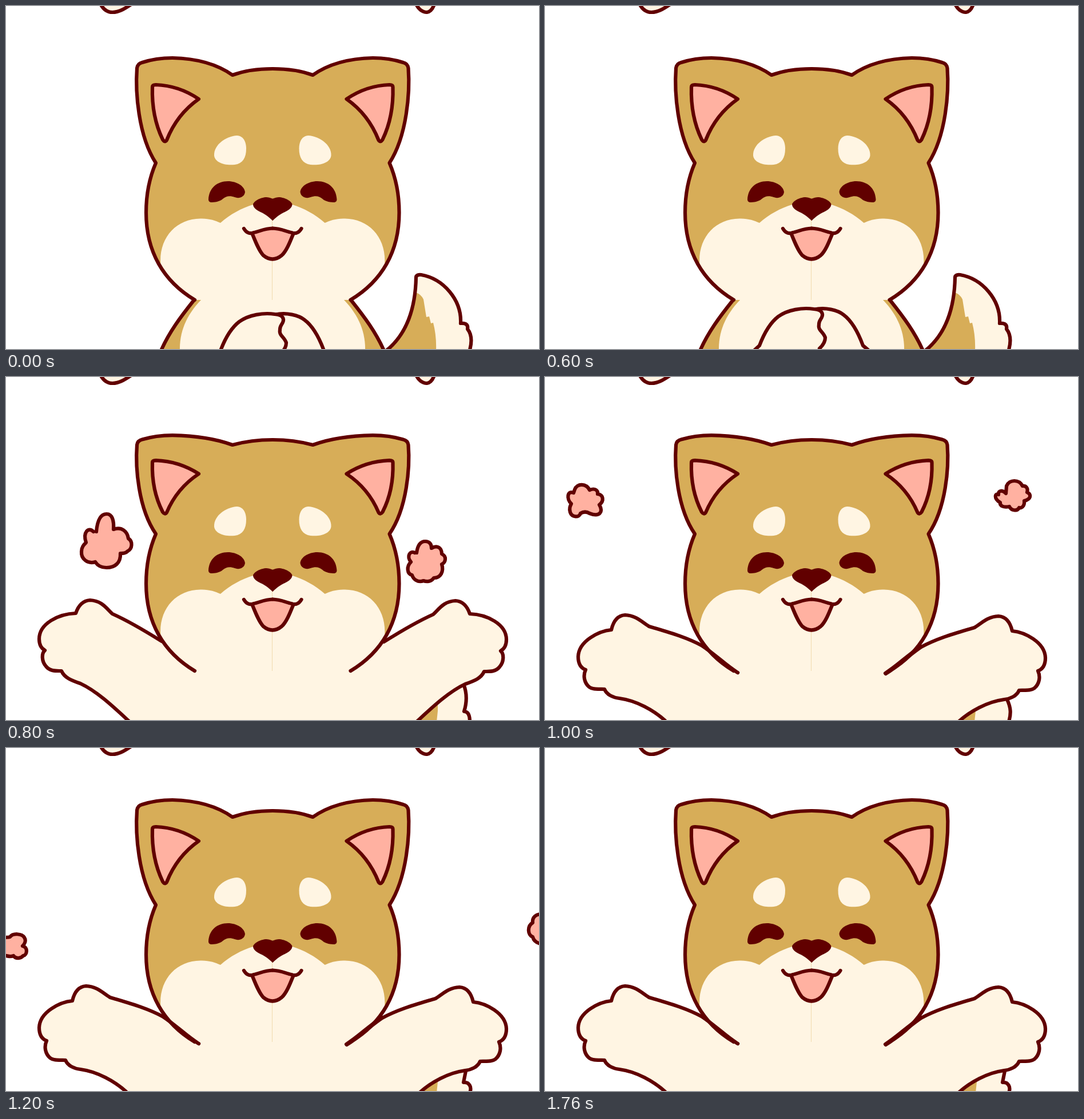
An HTML page with a canvas for the animation above (2 s loop, 932x601 px).

```html
<!DOCTYPE html>
<html lang="en">
<head>
<meta charset="utf-8">
<title>Happy puppy</title>
<style>
html, body { margin: 0; width: 100%; height: 100%; overflow: hidden; background: #fff; }
canvas { display: block; }
</style>
</head>
<body>
<canvas id="stage" width="932" height="601"></canvas>
<script>
const ctx = document.getElementById('stage').getContext('2d');
const TAN = '#d7ad58', CREAM = '#fff5e3', PINK = '#ffb1a1', LINE = '#610000';
const LOOP = 2000;

// Poses hold until the next start time.
const POSES = [
  { at: 0, arms: 'clasped', lift: 0, ears: 1, tail: 'full' },
  { at: 600, arms: 'clasped', lift: 9, ears: 1, tail: 'full' },
  { at: 800, arms: 'high', ears: 0.94, tail: 'high', puffs: 'near' },
  { at: 1000, arms: 'wide', ears: 0.94, tail: 'low', puffs: 'far' },
  { at: 1200, arms: 'wide', ears: 1, tail: 'mid', puffs: 'leaving' },
  { at: 1400, arms: 'wide', ears: 1, tail: 'mid' }
];

const ARMS = {
  high: 'M272 463C245 446 215 428 186 415C176 406 168 392 147 391C133 392 126 402 122 414' +
    'C92 415 58 432 58 459C58 468 61 475 68 479C62 484 62 498 70 507C77 516 88 515 97 515' +
    'C102 527 115 532 130 537C160 551 190 580 216 604',
  wide: 'M337 518C315 504 300 488 275 471C245 455 215 447 182 437C170 430 160 418 140 417' +
    'C125 418 119 430 116 443C95 445 59 462 58 490C58 502 63 510 71 513C66 524 69 536 77 543' +
    'C85 549 95 546 104 547C108 557 120 562 130 563C160 567 190 584 210 602'
};

const TAILS = {
  high: ['M800 538C806 553 806 570 801 586Q811 586 811 604', 755],
  low: ['M808 565C815 580 815 590 811 604', 753],
  mid: ['M804 566L800 586C810 585 815 594 811 604', 755]
};

const PUFFS = {
  near: [
    'M158 271C160 248 167 240 176 240C186 240 189 252 188 267C202 262 212 270 214 283' +
    'C222 288 221 301 213 305C209 309 205 309 200 309C201 326 190 334 176 334' +
    'C165 334 160 330 156 324C143 328 131 319 132 306C132 298 136 294 140 290' +
    'C134 272 144 262 153 271',
    'M718 308C720 293 726 288 733 288C741 288 744 293 744 300C754 294 762 299 762 310' +
    'C771 314 769 325 762 328C766 341 760 352 748 352C744 359 735 359 730 357' +
    'C720 361 712 354 710 347C701 345 700 332 708 324C700 315 706 303 715 308'
  ],
  far: [
    'M52 197C56 186 72 186 78 198C88 194 93 199 92 205C102 206 104 217 95 224' +
    'C102 236 96 246 78 239Q70 234 62 239C60 247 47 246 44 237C42 230 44 226 46 222' +
    'C37 214 39 198 50 203Z',
    'M807 191C812 179 829 179 835 191C842 190 845 196 843 202C851 206 850 214 838 217' +
    'C839 228 832 230 829 229C826 236 815 234 812 227C802 229 795 226 796 220' +
    'C784 213 787 203 793 206C792 198 800 198 806 204Z'
  ],
  leaving: [
    'M-8 334C-2 330 3 333 7 331C12 324 28 325 32 332C36 338 32 344 29 347' +
    'C39 349 37 363 30 364C26 369 17 370 13 364C7 367 1 364 -8 362',
    'M940 291C926 290 920 297 921 306C911 312 912 328 921 331C923 339 930 343 940 344'
  ]
};

function fill(path, color) {
  ctx.fillStyle = color;
  ctx.fill(new Path2D(path));
}

function stroke(path) {
  ctx.stroke(new Path2D(path));
}

function outlined(path, color) {
  fill(path, color);
  stroke(path);
}

// Draws both halves; the right one may sit slightly off the mirror image.
function mirrored(draw, dx = 0, dy = 0) {
  draw();
  ctx.save();
  ctx.translate(932 + dx, dy);
  ctx.scale(-1, 1);
  draw();
  ctx.restore();
}

function drawTail(kind) {
  if (kind === 'full') {
    const edge = 'M666 603C700 575 716 530 717 475Q718 470 726 471' +
      'C765 478 797 515 795 556Q809 555 807 566C815 576 815 590 810 606';
    fill(edge, CREAM);
    fill('M666 604C700 575 714 540 716 502Q725 504 730 514L735 545L740 544' +
      'L743 556L747 555Q753 578 752 604Z', TAN);
    stroke(edge);
    return;
  }
  const [edge, split] = TAILS[kind];
  fill(edge + 'L690 604L690 540Z', CREAM);
  fill(`M690 604L690 540L${split} 560L${split} 585L${split - 2} 604Z`, TAN);
  stroke(edge);
}

function drawBody() {
  const side = 'M329 515C305 545 285 572 271 604';
  mirrored(() => {
    fill(side + 'L467 604L467 505L345 505Z', TAN);
    fill('M346 510C318 537 303 568 304 604L467 604L467 505Z', CREAM);
    stroke(side);
  });
}

function drawPaws(lift) {
  ctx.save();
  ctx.translate(0, -lift);
  const left = 'M364 614L375 604C384 580 395 563 408 553C425 541 450 537 470 540';
  outlined('M470 541C490 536 512 542 522 550C538 562 548 582 556 604L568 614', CREAM);
  fill(left + 'L484 545L486 614Z', CREAM);
  stroke(left + 'Q484 541 485 549C486 556 478 559 479 568C477 577 487 580 490 590Q490 600 480 609');
  ctx.restore();
}

function drawArms(kind) {
  mirrored(() => {
    fill(ARMS[kind] + 'L468 604L468 500L330 500Z', CREAM);
    stroke(ARMS[kind]);
  }, 1, kind === 'wide' ? 2 : 1);
}

function drawHead(ears) {
  const y = v => 275 - (275 - v) * ears;
  const [dip, crest] = ears < 1 ? [119, 110] : [121, 104];
  const half = `M466 110C442 110 418 113 396 ${dip}C372 ${crest} 340 ${y(92)} 291 ${y(91)}` +
    `C268 ${y(91)} 250 ${y(95)} 238 ${y(99)}Q230 ${y(101)} 229 ${y(109)}` +
    `C226 ${y(150)} 231 ${y(227)} 262 275C249 305 245 335 245 362C245 430 275 482 330 515`;
  const shape = half + 'L467 515L467 110Z';
  const inner = `M256 ${y(142)}Q256 ${y(138)} 262 ${y(138)}C290 ${y(139)} 315 ${y(148)} 337 ${y(163)}` +
    `C310 ${y(182)} 292 ${y(207)} 281 ${y(235)}Q278 ${y(240)} 274 ${y(234)}` +
    `C260 ${y(205)} 255 ${y(175)} 256 ${y(142)}Z`;

  mirrored(() => {
    fill(shape, TAN);
    ctx.save();
    ctx.clip(new Path2D(shape));
    fill('M272 465C262 413 293 373 340 372.5C355 372 366 376 375 380' +
      'C392 365 412 354 432 348Q450 345 467 345L467 520L272 520Z', CREAM);
    ctx.restore();
    stroke(half);
    outlined(inner, PINK);
  }, 0.5);
}

function drawFace() {
  const mouth = 'M416 390C420 397 426 400 433 397C443 395 452 390 466 389.5';
  const tongue = 'M431 400C437 415 443 430 450 437Q466 450 482 437C490 430 496 415 502 400';
  fill(tongue + 'C490 396 480 390 466 390C452 390 442 396 431 400Z', PINK);
  stroke(tongue);
  mirrored(() => {
    fill('M364 262C363 243 385 228 404 227C416 228 420 239 420 250' +
      'C420 266 414 276 400 278C380 280 365 273 364 262Z', CREAM);
    fill('M354 339C355 319 369 307 388 307C404 307 417 316 418 326' +
      'C417 335 407 338 400 335C391 332 385 333 379 338C374 343 364 344 358 344Q354 343 354 339Z', LINE);
    fill('M467 338C460 335 454 334 449 336C443 337 434 342 432 347' +
      'C432 353 437 357 445 361C454 365 460 370 466 376L467 375Z', LINE);
    stroke(mouth);
  }, 0.5);
}

function drawEdgeBits() {
  outlined('M164 -6C169 5 177 11 186 11C198 11 209 4 222 -5', CREAM);
  outlined('M716 -6C720 5 728 11 736 11C743 10 747 4 750 -6', CREAM);
}

function render(time) {
  const pose = POSES.filter(p => p.at <= time).pop();
  ctx.fillStyle = '#fff';
  ctx.fillRect(0, 0, 932, 601);
  ctx.strokeStyle = LINE;
  ctx.lineWidth = 6.2;
  ctx.lineCap = ctx.lineJoin = 'round';

  drawEdgeBits();
  drawTail(pose.tail);
  if (pose.arms === 'clasped') drawBody();
  else drawArms(pose.arms);
  drawHead(pose.ears);
  drawFace();
  if (pose.arms === 'clasped') drawPaws(pose.lift);
  // The raised arm line continues over the cheek.
  if (pose.arms === 'wide') mirrored(() => stroke('M337 518C315 504 300 488 275 471'), 0, 1);
  for (const puff of PUFFS[pose.puffs] || []) outlined(puff, PINK);
}

let start;
function tick(now) {
  start ??= now;
  render(Math.max(0, now - start) % LOOP);
  requestAnimationFrame(tick);
}
render(0);
requestAnimationFrame(tick);
</script>
</body>
</html>
```
